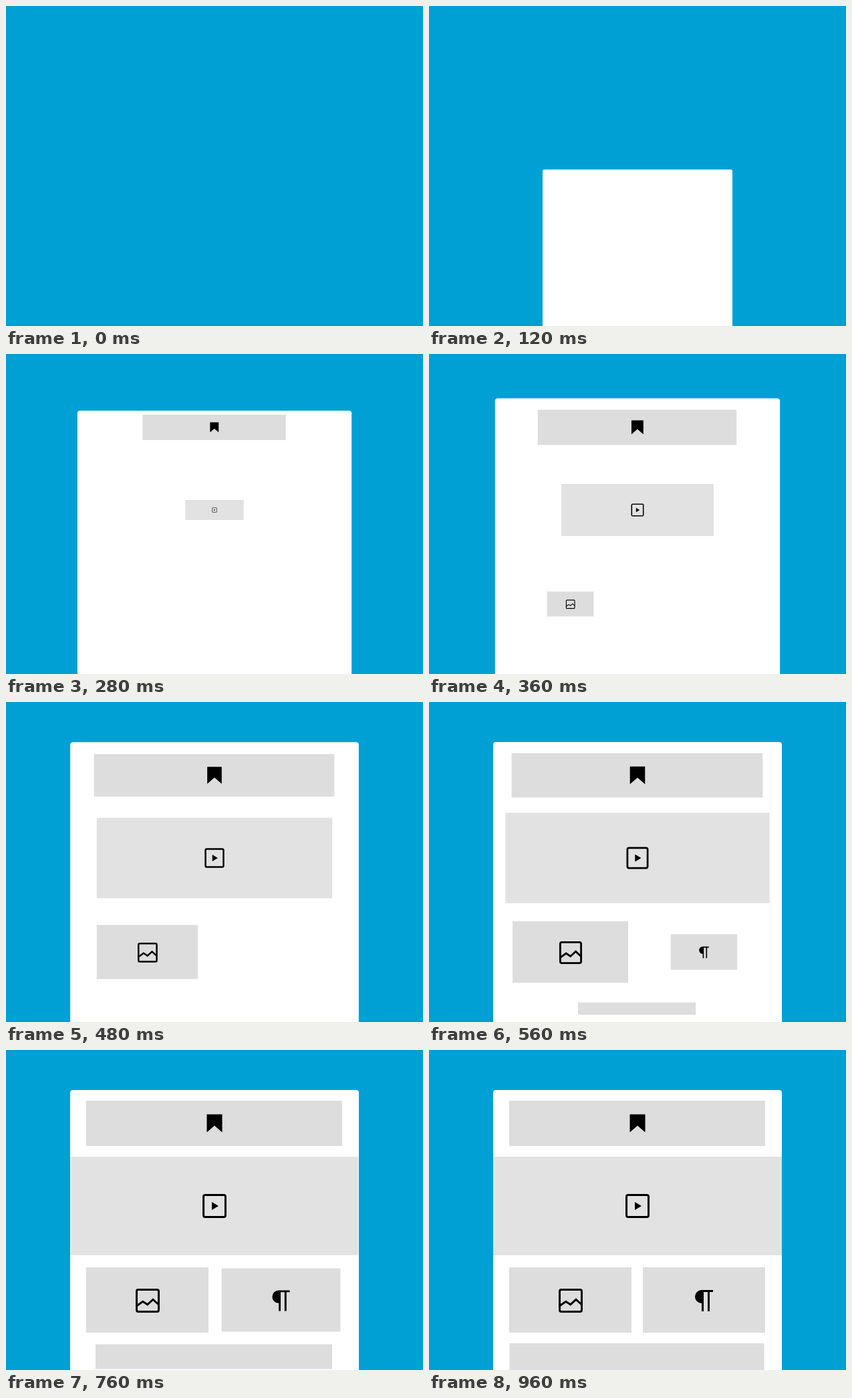
An HTML page that plays this animation: 624x480 px, repeating every 1040 ms.

```html
<!DOCTYPE html>
<html lang="en">
<head>
<meta charset="utf-8">
<title>Page layout</title>
<style>
html, body { margin: 0; width: 100%; height: 100%; overflow: hidden; background: #00a0d5; }
svg { display: block; width: 624px; height: 480px; }
.line { fill: none; stroke: #000; stroke-width: 3; stroke-linejoin: round; }
</style>
</head>
<body>
<svg viewBox="0 0 624 480">
  <rect id="page" height="600" fill="#fff"/>
  <g id="header">
    <rect x="120" y="76" width="383" height="68" fill="#ddd"/>
    <path d="M300.5 96.5h23v27l-11.5-10-11.5 10z"/>
  </g>
  <g id="video">
    <rect x="96" y="160" width="432" height="148" fill="#e2e2e2"/>
    <rect class="line" x="295.5" y="217.5" width="33" height="33" rx="2.5"/>
    <path d="M308 228l10 6-10 6z"/>
  </g>
  <g id="image">
    <rect x="120" y="326" width="183" height="98" fill="#ddd"/>
    <rect class="line" x="195.5" y="359.5" width="33" height="33" rx="2.5"/>
    <path class="line" style="stroke-linejoin:miter" d="M196 383.5l8.7-6.3 7 4.6 8.3-7.6 8.5 7.8"/>
  </g>
  <g id="text">
    <rect x="320" y="326" width="183" height="98" fill="#ddd"/>
    <path d="M425 360v3h-5v29h-3v-29h-6v29h-3v-12a10 10 0 0 1 0-20z"/>
  </g>
  <g id="footer">
    <rect x="120" y="440" width="382" height="40" fill="#ddd"/>
  </g>
</svg>
<script>
const LOOP = 1040, STEP = 40, LAST = 960;
const el = id => document.getElementById(id);
const page = el('page');

// Blocks grow from their centre: start and duration in ms, ease-out power.
const blocks = [
  { id: 'header', cx: 311.5, cy: 110, start: 163, dur: 630, power: 4 },
  { id: 'video', cx: 312, cy: 234, start: 242, dur: 690, power: 4 },
  { id: 'image', cx: 211.5, cy: 375, start: 304, dur: 495, power: 4 },
  { id: 'text', cx: 411.5, cy: 375, start: 480, dur: 551, power: 5 },
  { id: 'footer', cx: 311, cy: 460, start: 480, dur: 687, power: 5 }
];
for (const b of blocks) b.node = el(b.id);

// Share of the growth still to come, from 1 down to 0.
function remaining(t, start, dur, power) {
  const p = Math.min(1, Math.max(0, (t - start) / dur));
  return Math.pow(1 - p, power);
}

function drawPage(t) {
  const left = remaining(t, 0, 622, 5);
  const s = 1 - left;
  const drop = left * (486 + 97 * (1 - s * s));
  page.setAttribute('x', 312 - 216 * s);
  page.setAttribute('y', 60 + drop);
  page.setAttribute('width', 432 * s);
  page.setAttribute('rx', 4 * s);
}

function draw(t) {
  drawPage(t);
  for (const b of blocks) {
    const s = 1 - remaining(t, b.start, b.dur, b.power);
    b.node.style.display = s > 0 ? '' : 'none';
    b.node.setAttribute('transform',
      `translate(${b.cx} ${b.cy}) scale(${s}) translate(${-b.cx} ${-b.cy})`);
  }
}

const begin = performance.now();
function tick() {
  const t = (performance.now() - begin) % LOOP;
  draw(Math.min(LAST, Math.floor(t / STEP) * STEP));
  requestAnimationFrame(tick);
}
tick();
</script>
</body>
</html>
```
